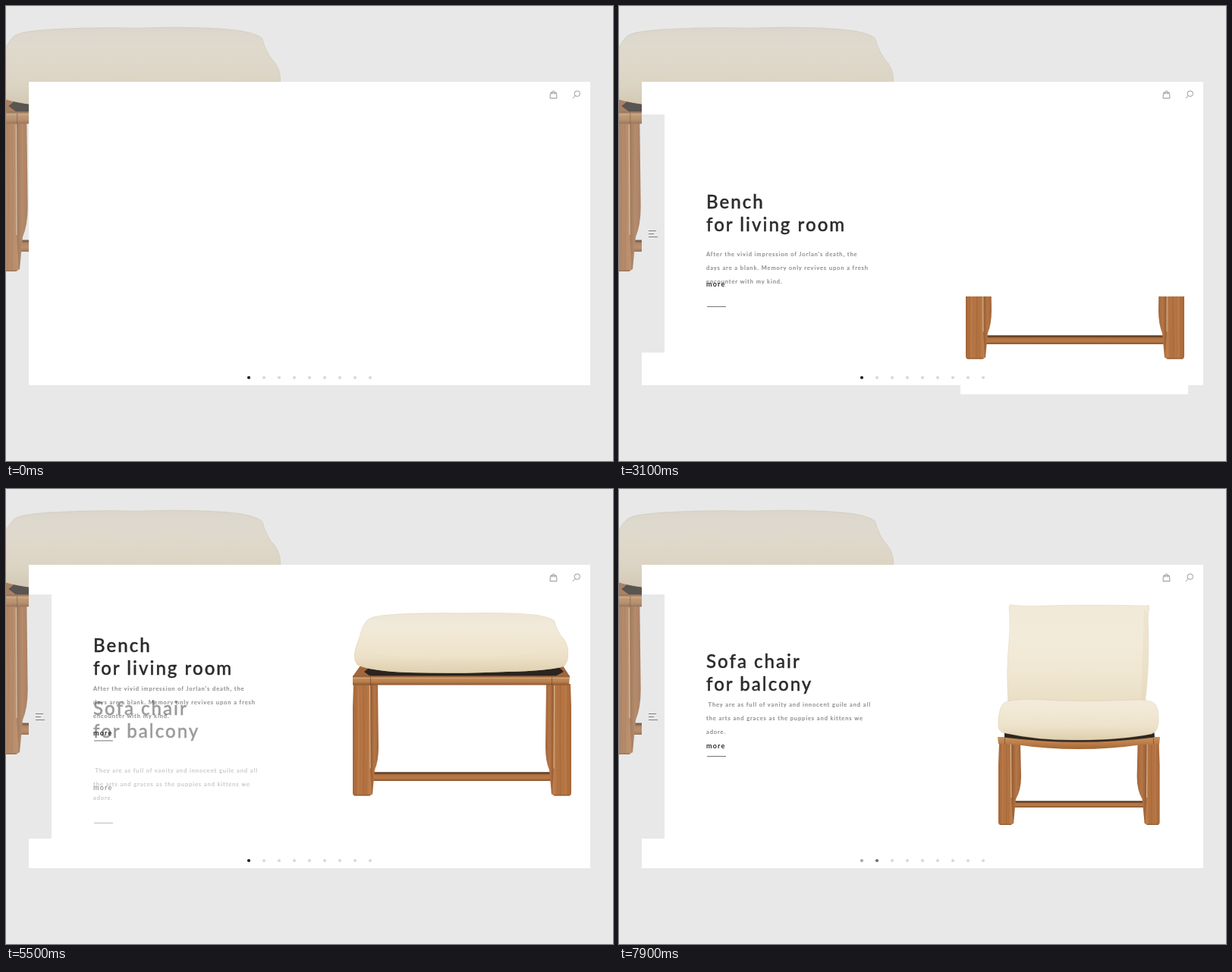
These frames come from a looping animation (800 px wide and 600 px high, 8000 ms). An HTML page with a canvas:

```html
<!DOCTYPE html>
<html lang="en">
<head>
<meta charset="utf-8">
<title>Furniture slider</title>
<style>
  html, body { margin: 0; width: 100%; height: 100%; overflow: hidden; background: #e8e8e8; }
  #stage { position: relative; width: 800px; height: 600px; overflow: hidden; font-family: Lato, "Open Sans", sans-serif; }
  canvas, .slide, .slide > * { position: absolute; left: 0; top: 0; margin: 0; }
  .slide > * { left: 115px; white-space: pre; }
  h1 { font-size: 24px; line-height: 30px; font-weight: 500; letter-spacing: 2.05px; color: #2b2b2b; -webkit-text-stroke: 0.4px; }
  p { font-size: 7.5px; line-height: 18px; font-weight: 500; letter-spacing: 0.92px; color: #8c8c8c; -webkit-text-stroke: 0.2px; }
  b { font-size: 9px; line-height: 18px; font-weight: 700; letter-spacing: 1.15px; color: #2b2b2b; }
  .slide > i { left: 116px; width: 25px; height: 1px; background: #747474; }
</style>
</head>
<body>
<div id="stage">
  <canvas id="view" width="800" height="600"></canvas>
  <div class="slide" id="bench"><h1>Bench
for living room</h1><p>After the vivid impression of Jorlan's death, the
days are a blank. Memory only revives upon a fresh
encounter with my kind.</p><b>more</b><i></i></div>
  <div class="slide" id="sofa"><h1>Sofa chair
for balcony</h1><p> They are as full of vanity and innocent guile and all
the arts and graces as the puppies and kittens we
adore.</p><b>more</b><i></i></div>
</div>
<script>
const LOOP = 8000;
const ctx = document.getElementById('view').getContext('2d');

// Smooth monotone curve through [time, value] points, held at both ends.
function track(...pts) {
  const n = pts.length;
  const slope = pts.slice(1).map((p, i) => (p[1] - pts[i][1]) / (p[0] - pts[i][0]));
  const tan = pts.map((p, i) => {
    if (i === 0) return slope[0];
    if (i === n - 1) return slope[n - 2];
    const a = slope[i - 1], b = slope[i];
    return a * b <= 0 ? 0 : 2 * a * b / (a + b);
  });
  return t => {
    if (t <= pts[0][0]) return pts[0][1];
    if (t >= pts[n - 1][0]) return pts[n - 1][1];
    let i = 0;
    while (t > pts[i + 1][0]) i++;
    const [t0, v0] = pts[i], [t1, v1] = pts[i + 1];
    const d = t1 - t0, u = (t - t0) / d, w = 1 - u;
    return v0 * (1 + 2 * u) * w * w + tan[i] * d * u * w * w
      + v1 * u * u * (3 - 2 * u) - tan[i + 1] * d * u * u * w;
  };
}

const motion = {
  panel: track([0, 0], [250, 3], [900, 38], [1700, 83], [2700, 139], [3100, 157], [3500, 161]),
  menu: track([1600, 0], [1700, 0.12], [2300, 1]),
  stoolTop: track([2200, 259.5], [3100, 212], [3900, 169], [4250, 154], [4500, 151],
    [5600, 151], [5900, 139.5], [6200, 123.5], [6750, 96]),
  stoolShown: track([2200, 0], [3100, 129], [3900, 247], [4300, 300]),
  stoolAlpha: track([5850, 1], [6200, 0.8], [6750, 0]),
  chairEdge: track([6030, 451], [6200, 417], [7400, 175], [7600, 150]),
  dotOn: track([7500, 0], [7900, 0.58], [8200, 1]),
  dotOff: track([7500, 1], [7900, 0.27], [8100, 0]),
  fadeIn: track([1605, 0], [2020, 1]),
  fadeOut: track([5500, 1], [5900, 0]),
  leave: track([5150, 0], [5500, -20], [5900, -55])
};

const rows = {
  h1: track([1600, 291.5], [1800, 289.5], [2500, 274.5], [3100, 258], [3900, 233], [4200, 227], [4400, 226.5]),
  p: track([1600, 375.5], [1800, 372.5], [2500, 352], [3100, 328], [3900, 294], [4200, 284.5], [4400, 284]),
  b: track([1600, 396], [1800, 394], [2500, 382], [3100, 367], [3900, 345], [4200, 339], [4400, 339]),
  i: track([1600, 442], [1800, 440], [2500, 419], [3100, 396], [3900, 361], [4200, 352], [4400, 351.5])
};
const half = { h1: 15, p: 9, b: 9, i: 0 };

function sprite(scale, left, top, draw) {
  const c = document.createElement('canvas');
  c.width = c.height = Math.round(300 * scale);
  const g = c.getContext('2d');
  g.scale(scale, scale);
  g.translate(-left, -top);
  draw(g);
  return c;
}

function shape(g, d, fill) {
  g.fillStyle = fill;
  g.fill(new Path2D(d));
}

function line(g, d, color, width) {
  g.strokeStyle = color;
  g.lineWidth = width;
  g.stroke(new Path2D(d));
}

function ramp(g, x0, y0, x1, y1, ...colors) {
  const r = g.createLinearGradient(x0, y0, x1, y1);
  colors.forEach((c, i) => r.addColorStop(i / (colors.length - 1), c));
  return r;
}

// Bentwood leg: broad front face plus the inner face that bends in towards the foot.
function leg(g, x, top, bot, outer, inner) {
  const m = x + outer, r = m + inner;
  shape(g, `M${m - 2} ${top}L${r - 1} ${top}L${r} ${bot - 64}Q${r} ${bot - 46} ${m + 6} ${bot - 34}`
    + `L${m + 3} ${bot - 2}L${m - 4} ${bot}Z`,
    ramp(g, m, 0, r, 0, '#94592f', '#b57647', '#a2653a'));
  shape(g, `M${x + 1} ${top}L${m - 1} ${top}L${m} ${bot - 40}Q${m + 1} ${bot - 20} ${m + 2} ${bot - 3}`
    + `Q${m + 2} ${bot} ${m - 2} ${bot}L${x + 3} ${bot}Q${x} ${bot} ${x} ${bot - 4}L${x} ${top + 30}Z`,
    ramp(g, x, 0, m, 0, '#a46537', '#bb7a48', '#b0703f', '#bd7e4c'));
  for (let k = 1; k < 5; k++) {
    const gx = x + outer * k / 5;
    line(g, `M${gx} ${top + 2}Q${gx + 2} ${(top + bot) / 2} ${gx} ${bot - 1}`, 'rgba(105,58,26,.2)', 0.7);
  }
  line(g, `M${m - 0.5} ${top + 2}L${m} ${bot - 36}`, '#e0c09c', 1);
  line(g, `M${x + 2} ${bot - 0.7}L${m} ${bot - 0.7}`, '#8a5429', 1);
}

function legs(g, center, ...args) {
  for (const side of [1, -1]) {
    g.save();
    g.translate(center, 0);
    g.scale(side, 1);
    g.translate(-center, 0);
    leg(g, ...args);
    g.restore();
  }
}

function rung(g, x0, x1, y, h) {
  g.fillStyle = ramp(g, 0, y, 0, y + h, '#75472a', '#b2733f', '#b97b49', '#8a552d');
  g.fillRect(x0, y, x1 - x0, h);
  g.fillStyle = '#5f3c25';
  g.fillRect(x0, y, x1 - x0, 2);
}

function stool(g) {
  rung(g, 483, 719, 373.5, 11.5);
  legs(g, 601, 457, 257, 404.5, 23, 11);
  shape(g, 'M467 233L734 233L743 247L457 247Z', '#a1663c');
  shape(g, 'M478 236L730 236L735 241L724 247L480 247L472 241Z', '#2b241f');
  shape(g, 'M457 246.5L743 246.5L742 258.5L457 258.5Z',
    ramp(g, 0, 247, 0, 258.5, '#c08a58', '#c18953', '#b87c49', '#875531'));
  line(g, 'M457 247L743 247', '#7c4c2c', 1);
  line(g, 'M458 249.5L742 249.5', '#d3a577', 1);
  line(g, 'M480.5 248L480.5 258M719.5 248L719.5 258', 'rgba(90,52,24,.5)', 1);
  const body = 'M477 172Q481 168 500 166Q540 162.5 600 163.5Q660 161.5 700 166Q718 169 723 174'
    + 'Q727 188 733 195Q741 203 741 215Q742 228 735 234Q715 240 660 241Q600 244 530 242'
    + 'Q480 240 463 232Q457 226 460 211Q463 202 466 194Q469 179 477 172Z';
  shape(g, body, ramp(g, 0, 163, 0, 243, '#ede6d7', '#f2ead9', '#f0e6d0', '#ede2c9', '#dfd1b2'));
  g.save();
  g.clip(new Path2D(body));
  shape(g, 'M455 208Q500 222 560 226Q650 226 745 208L745 250L455 250Z',
    ramp(g, 0, 208, 0, 243, 'rgba(228,215,184,0)', 'rgba(222,207,173,.4)'));
  line(g, body, 'rgba(205,190,158,.3)', 1.4);
  g.restore();
}

function chair(g) {
  rung(g, 520, 692, 411.5, 8.5);
  legs(g, 606.3, 500, 334, 443, 17, 13);
  shape(g, 'M508 318L705 318L706 327Q606 344 508 327Z', '#2b241f');
  shape(g, 'M499 327L509 327Q606 339 704 327L713 327L712 337L690 337Q606 349 522 337L500 336Z',
    ramp(g, 0, 327, 0, 344, '#c79460', '#bb7c49', '#a0642f'));
  line(g, 'M509 327Q606 339 704 327', '#3a2a1e', 1.6);
  line(g, 'M508.5 327L508.5 336M704.5 327L704.5 336', 'rgba(90,52,24,.5)', 1);
  const back = 'M515 152.5Q530 155 560 154Q620 152 695 154L698 153L699 157Q696 170 698 190'
    + 'Q699 240 693 284L513 284Q510 240 514 200Q516 175 514 156Z';
  shape(g, back, ramp(g, 0, 153, 0, 284, '#f1e9d8', '#f3ebda', '#f0e7d2', '#e9dec4'));
  line(g, back, 'rgba(209,194,160,.4)', 0.8);
  shape(g, 'M692 158Q690 220 688 281L693 281Q699 230 697 165Z', 'rgba(218,204,170,.25)');
  const seat = 'M512 280Q505 281 502 292Q499 302 500 313Q501 321 509 322Q555 332 606 331'
    + 'Q660 331 702 323Q710 320 711 308Q712 292 707 284Q702 278 685 278Q600 281 560 278Q530 276 512 280Z';
  shape(g, seat, ramp(g, 0, 278, 0, 331, '#f3ebda', '#f1e8d4', '#ede2ca', '#ddcfae'));
  line(g, seat, 'rgba(205,190,155,.4)', 0.8);
}

const art = {
  stool: sprite(1, 450, 151, g => {
    g.fillStyle = '#fff';
    g.fillRect(450, 151, 300, 300);
    stool(g);
  }),
  backdrop: sprite(4 / 3, 450, 151, stool),
  chair: sprite(1, 450, 151, chair)
};

function box(x, y, w, h, color) {
  ctx.fillStyle = color;
  ctx.fillRect(x, y, w, h);
}

function icons() {
  line(ctx, 'M717.5 114.5L725.5 114.5L726 121.5L717 121.5ZM719.5 116.5L719.5 113Q721.5 111 723.5 113L723.5 116.5', '#989898', 1);
  line(ctx, 'M756.5 115.6A3.7 3.7 0 1 1 749.1 115.6A3.7 3.7 0 1 1 756.5 115.6M750.2 118.3L747 121.8', '#989898', 1);
}

function dots(t) {
  for (let i = 0; i < 9; i++) {
    const on = i === 0 ? motion.dotOff(t) : i === 1 ? motion.dotOn(t) : 0;
    const v = Math.round(217 - 183 * on);
    ctx.fillStyle = `rgb(${v},${v},${v})`;
    ctx.beginPath();
    ctx.arc(320 + 20 * i, 490, 2.1, 0, 7);
    ctx.fill();
  }
}

function paint(t) {
  box(0, 0, 800, 600, '#e8e8e8');
  ctx.globalAlpha = 0.74;
  ctx.globalCompositeOperation = 'multiply';
  ctx.drawImage(art.backdrop, -26, 12);
  ctx.globalCompositeOperation = 'source-over';
  ctx.globalAlpha = 1;
  box(30, 100, 740, 400, '#fff');

  const h = motion.panel(t);
  box(30, 300 - h, 30, 2 * h, '#e8e8e8');
  ctx.globalAlpha = motion.menu(t);
  [10, 7, 12].forEach((w, i) => box(39, 296 + 4 * i, w, 1, '#808080'));
  ctx.globalAlpha = 1;

  const cut = Math.round(motion.chairEdge(t)) - 151;
  if (cut < 300) {
    const c = Math.max(0, cut);
    ctx.drawImage(art.chair, 0, c, 300, 300 - c, 450, 151 + c, 300, 300 - c);
  }

  const shown = Math.round(motion.stoolShown(t)), alpha = motion.stoolAlpha(t);
  if (shown > 0 && alpha > 0) {
    const y = Math.round(motion.stoolTop(t)) + 300 - shown;
    ctx.globalAlpha = alpha;
    ctx.drawImage(art.stool, 0, 300 - shown, 300, shown, 450, y, 300, shown);
    ctx.globalAlpha = 1;
  }
  icons();
  dots(t);
}

function place(id, t, shift, alpha) {
  const el = document.getElementById(id);
  el.style.opacity = alpha;
  for (const tag in rows) {
    const dy = tag === 'b' ? shift * 0.85 : shift;
    el.querySelector(tag).style.transform = `translateY(${(rows[tag](t) - half[tag] + dy).toFixed(2)}px)`;
  }
}

const start = performance.now();
function frame() {
  const t = (performance.now() - start) % LOOP;
  paint(t);
  place('bench', t, motion.leave(t), motion.fadeIn(t) * motion.fadeOut(t));
  place('sofa', t - 3700, 0, motion.fadeIn(t - 3700));
  requestAnimationFrame(frame);
}
frame();
</script>
</body>
</html>
```
